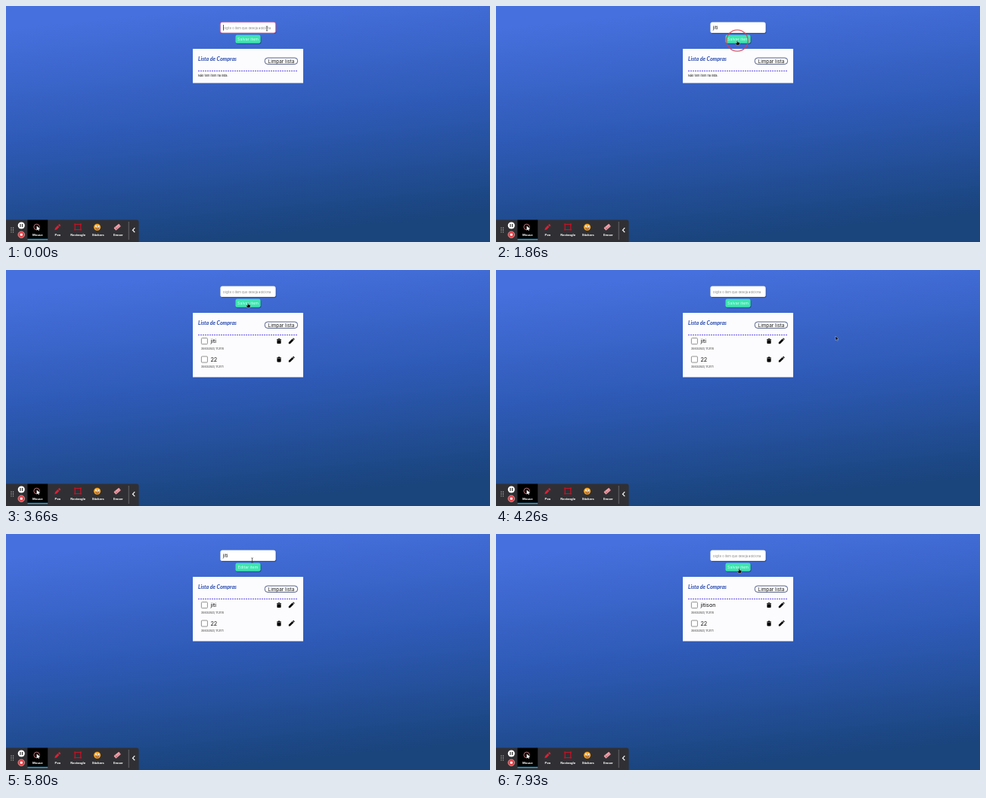
An HTML page that plays this animation: 640 by 314 pixels, repeating every 8000 ms.

```html
<!DOCTYPE html>
<html lang="pt">
<head>
<meta charset="utf-8">
<title>Lista de Compras</title>
<style>
  html, body { margin: 0; width: 100%; height: 100%; overflow: hidden; background: #2755ae; }
  svg { display: block; }
  #stage { width: 100vw; height: 100vh; }
  text { font-family: Inter, sans-serif; fill: #151515; white-space: pre; }
  .title { font: italic 700 7.1px Lato, sans-serif; fill: #2346ad; }
  .date { font-size: 3.1px; }
  .name { font-size: 7.3px; }
  .tool { font: 700 4.4px Roboto, sans-serif; fill: #fff; text-anchor: middle; }
  .mid { text-anchor: middle; }
</style>
</head>
<body>
<svg id="stage" viewBox="0 0 640 314" preserveAspectRatio="none">
  <defs>
    <linearGradient id="sky" gradientUnits="userSpaceOnUse" x1="304" y1="0" x2="334" y2="306">
      <stop offset="0" stop-color="#4670dd"/>
      <stop offset=".5" stop-color="#2e5ab6"/>
      <stop offset="1" stop-color="#19447c"/>
    </linearGradient>
    <filter id="soft" x="-20%" y="-30%" width="140%" height="180%">
      <feDropShadow dx=".7" dy="1" stdDeviation=".6" flood-color="#0a1d50" flood-opacity=".6"/>
    </filter>
    <g id="trash">
      <path d="M-3-2.4h6V-1.7H-3zM-1.1-3.3h2.2l.5.9h-3.2z"/>
      <path d="M-2.6-1.3H2.6V2.7q0 .8-.8.8H-1.8q-.8 0-.8-.8z"/>
    </g>
    <path id="pencil" d="M-3.6 3.6V1.7L1.2-3.1 3.1-1.2-1.7 3.6zM1.7-3.5l.5-.4q.4-.3.8 0l1 1q.3.4 0 .8l-.5.5z"/>
    <g id="row">
      <rect x="258.4" y="90.6" width="8" height="8" rx="1" fill="#fff" stroke="#777" stroke-width=".8"/>
      <use href="#trash" x="361" y="94.5"/>
      <use href="#pencil" x="377.4" y="94.6"/>
    </g>
  </defs>

  <rect width="640" height="314" fill="url(#sky)"/>

  <g filter="url(#soft)"><rect x="283.5" y="21.6" width="73" height="14.2" rx="2.6" fill="#fff"/></g>
  <rect id="focus" x="283.1" y="21.2" width="73.8" height="15" rx="3" fill="none" stroke="#c45b9c"/>
  <text id="hint" x="287" y="30.8" font-size="4.05" style="fill:#858585">Digite o item que deseja adiciona</text>
  <text id="typed" x="286.8" y="30.9" font-size="6.4"></text>
  <rect id="caret" y="25" width=".7" height="7.6" fill="#111"/>

  <g filter="url(#soft)"><rect x="303.5" y="38.6" width="33" height="10.8" rx="2.2" fill="#3de5b0"/></g>
  <text id="action" class="mid" x="320" y="46" font-size="5.3" style="fill:#d4fff1"></text>

  <rect id="card" x="247" y="57" width="146" fill="#fcfcfe"/>
  <text class="title" x="254" y="73">Lista de Compras</text>
  <rect x="342.3" y="69" width="43.2" height="8.4" rx="3.6" fill="#fff" stroke="#28366f" stroke-width=".8"/>
  <text class="mid" x="363.9" y="75.7" font-size="6.4">Limpar lista</text>
  <path d="M254 86.4H385.6" stroke="#4a38e4" stroke-width=".9" stroke-dasharray="2 1"/>
  <text id="empty" x="254" y="93.7" font-size="3.9">Não tem item na lista.</text>
  <g id="first">
    <use href="#row"/>
    <text id="name" class="name" x="270.4" y="97.2"></text>
    <text class="date" x="258" y="105.7">30/03/2023, 17:21:10</text>
  </g>
  <g id="second" transform="translate(0 24.4)">
    <use href="#row"/>
    <text class="name" x="270.4" y="97.2">22</text>
    <text class="date" x="258" y="105.7">30/03/2023, 17:21:11</text>
  </g>

  <g id="toolbar">
    <path d="M0 284.6H173q2.6 0 2.6 2.6V314H0z" fill="#303034"/>
    <rect x="28.4" y="284.6" width="26.8" height="26" fill="#000"/>
    <rect x="28.4" y="309.8" width="26.8" height="1.5" fill="#24a9e8"/>
    <path d="M7 295.2V302M9.6 295.2V302" stroke="#ccc" stroke-width="1.3" stroke-linecap="round" stroke-dasharray="0 2.8"/>
    <circle cx="20.3" cy="292" r="4.6" fill="#fff"/>
    <path d="M19 290v4M21.6 290v4" stroke="#222" stroke-width="1.1"/>
    <circle cx="20.3" cy="304.2" r="4.3" fill="#e33b42" stroke="#f4c4c5" stroke-width=".6"/>
    <rect x="18.8" y="302.7" width="3" height="3" fill="#fff"/>
    <circle cx="40.6" cy="294" r="3.8" fill="none" stroke="#e68a90" stroke-width=".8"/>
    <path d="M40.6 292.4v6l1.5-1.3.9 2 1-.5-.9-1.9h2z" fill="#fff"/>
    <path d="M64.2 298.3l.8-2.8 3.4-3.4 2 2-3.4 3.4zM69 291.5l1.5-1.5 2 2-1.5 1.5z" fill="#e31d35"/>
    <rect x="91.2" y="290.6" width="7.6" height="7" fill="none" stroke="#d3112b" stroke-width="1"/>
    <g fill="#c8101f">
      <path d="M90.2 289.6h2v2h-2zM97.8 289.6h2v2h-2zM90.2 296.6h2v2h-2zM97.8 296.6h2v2h-2z"/>
    </g>
    <circle cx="120.6" cy="294.2" r="4.5" fill="#f5a52c"/>
    <circle cx="119" cy="293" r="1.1" fill="#fff"/>
    <circle cx="122.4" cy="293" r="1.1" fill="#fff"/>
    <path d="M118.3 296q2.3 2 4.6 0" fill="none" stroke="#7b2c16" stroke-width=".9"/>
    <g transform="rotate(-40 147.2 294.2)">
      <rect x="142.8" y="292" width="8.8" height="4.4" rx=".8" fill="#f0a0aa"/>
      <path d="M145.2 292v4.4M143 294.8h8.4" stroke="#b8606d" stroke-width=".6"/>
    </g>
    <path d="M162.3 287V311" stroke="#8b8b8e" stroke-width=".6"/>
    <path d="M170.3 295.2L167.5 298.2L170.3 301.2" fill="none" stroke="#fff" stroke-width="1.2"/>
    <text class="tool" x="41.8" y="305.8">Mouse</text>
    <text class="tool" x="68.4" y="305.8">Pen</text>
    <text class="tool" x="95.2" y="305.8">Rectangle</text>
    <text class="tool" x="121.8" y="305.8">Stickers</text>
    <text class="tool" x="148.4" y="305.8">Eraser</text>
  </g>

  <circle id="ring" r="14.2" fill="none" stroke="#d8404f" stroke-width="1.3" opacity=".85"/>
  <g id="pointer" stroke="#fff" stroke-width=".35">
    <path id="beam" d="M-1.2-3.2Q0-3.2 0-2.3Q0-3.2 1.2-3.2M0-2.3V2.3M-1.2 3.2Q0 3.2 0 2.3Q0 3.2 1.2 3.2" fill="none" stroke="#333" stroke-width=".7"/>
    <path id="arrow" d="M0 0V5.6L1.3 4.4 2.2 6.4 3.1 6 2.2 4H4z" fill="#000"/>
    <path id="hand" d="M-.6 0Q0-.7.6 0V2L2.8 2.6Q3.4 2.8 3.2 3.6L2.6 6H-.8L-2.5 3.6Q-2.2 2.6-.6 3.6z" fill="#000"/>
  </g>
</svg>

<script>
  const LOOP = 8000;
  const $ = id => document.getElementById(id);
  const show = (id, on) => $(id).setAttribute('visibility', on ? 'visible' : 'hidden');

  // [time, x, y]
  const path = [
    [0, 345, 30], [300, 345, 30], [660, 341, 31], [1400, 341, 31],
    [1720, 319, 46], [2200, 319, 46], [2480, 321, 28], [3080, 321, 28],
    [3340, 320, 44], [3800, 320, 44], [4150, 449, 88], [4400, 449, 88],
    [4860, 381, 94], [4930, 381, 94], [5060, 378, 94], [5530, 378, 94],
    [5850, 322, 31], [6200, 323.5, 32], [7500, 323.5, 32],
    [7740, 321.5, 46], [8000, 321.5, 46]
  ];
  // [time, value]
  const typing = [
    [0, ''], [460, 'j'], [660, 'ji'], [860, 'jit'], [1060, 'jiti'], [1930, ''],
    [2800, '2'], [3000, '22'], [3530, ''], [5200, 'jiti'], [6460, 'jitis'],
    [6800, 'jitiso'], [7200, 'jitison'], [7900, '']
  ];
  const names = [[0, ''], [1930, 'jiti'], [7900, 'jitison']];
  const actions = [[0, 'Salvar item'], [5200, 'Editar item'], [7900, 'Salvar item']];
  const bottoms = [[0, 102.5], [1930, 118.3], [3530, 142.6]];
  const focus = [[0, true], [1800, false], [2540, true], [3420, false], [5950, true], [7780, false]];
  const clicks = [[1780, 1930], [2520, 2720], [3400, 3560], [5090, 5250], [5930, 6110], [7760, 7900]];

  const at = (list, t) => list.findLast(step => step[0] <= t)[1];

  function pointerAt(t) {
    const i = path.findLastIndex(p => p[0] <= t);
    const a = path[i], b = path[i + 1] || a;
    const u = (t - a[0]) / (b[0] - a[0] || 1);
    const k = u * u * (3 - 2 * u);
    return [a[1] + (b[1] - a[1]) * k, a[2] + (b[2] - a[2]) * k];
  }

  const inside = (x, y, l, t, r, b) => x >= l && x <= r && y >= t && y <= b;

  function cursorKind(x, y) {
    if (inside(x, y, 283, 21, 357, 36)) return 'beam';
    const clickable = inside(x, y, 303, 38, 337, 50) || inside(x, y, 342, 69, 386, 78) ||
      inside(x, y, 373, 90, 383, 99);
    return clickable ? 'hand' : 'arrow';
  }

  function draw(t) {
    const value = at(typing, t), focused = at(focus, t), bottom = at(bottoms, t);
    $('typed').textContent = value;
    show('hint', !value);
    show('focus', focused);
    show('caret', focused);
    $('caret').setAttribute('x', 287.2 + (value ? $('typed').getComputedTextLength() : 0));
    $('action').textContent = at(actions, t);
    $('name').textContent = at(names, t);
    $('card').setAttribute('height', bottom - 57);
    show('empty', bottom < 110);
    show('first', bottom > 110);
    show('second', bottom > 130);

    const [x, y] = pointerAt(t), kind = cursorKind(x, y), place = `translate(${x} ${y})`;
    $('pointer').setAttribute('transform', place);
    $('ring').setAttribute('transform', place);
    for (const id of ['beam', 'arrow', 'hand']) show(id, id === kind);
    show('ring', clicks.some(([from, to]) => t >= from && t < to));
  }

  const start = performance.now();
  function tick() {
    draw((performance.now() - start) % LOOP);
    requestAnimationFrame(tick);
  }
  tick();
</script>
</body>
</html>
```
